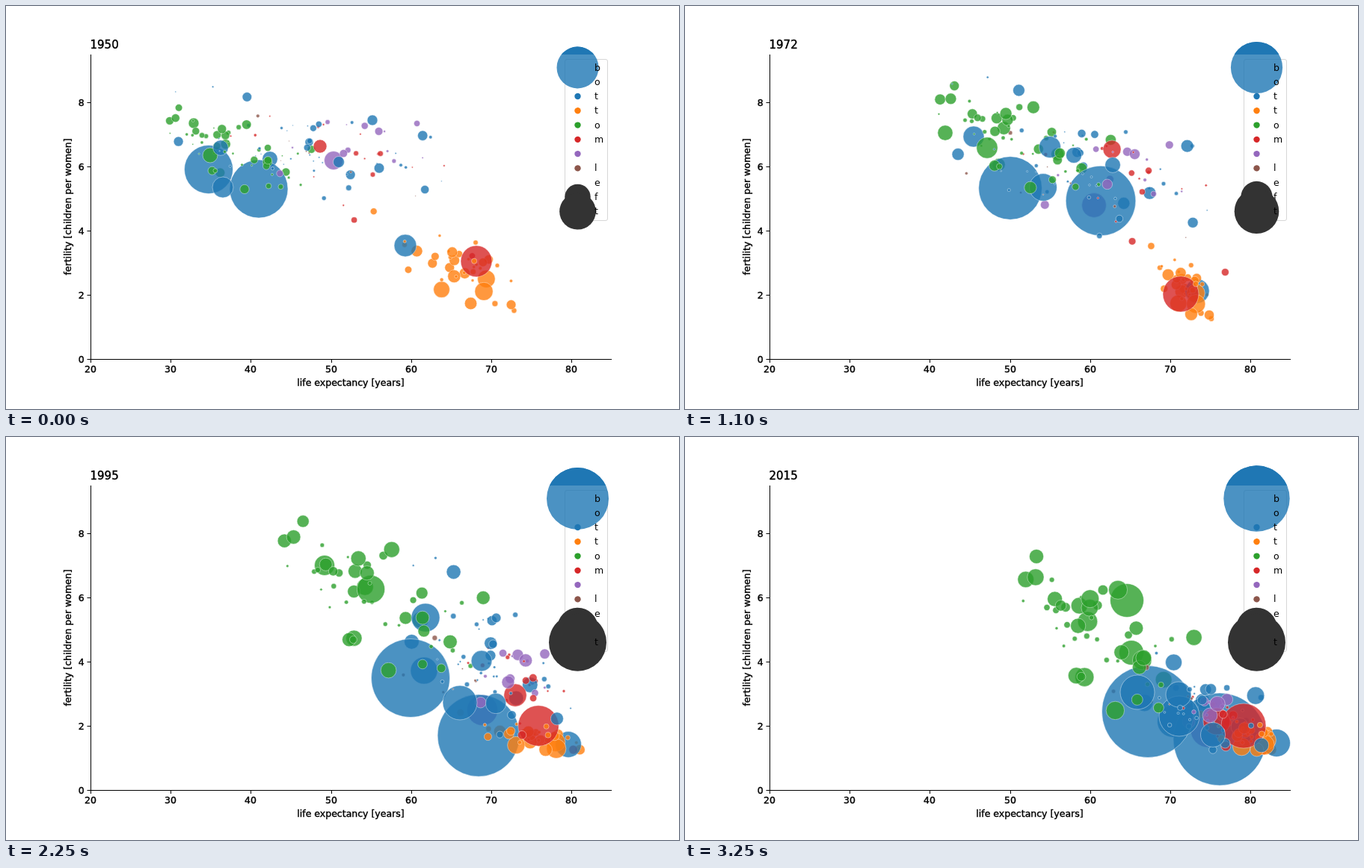
Recreate the animation shown at these times as an HTML page. Size 900 by 540 pixels, loop 3300 ms.

```html
<!DOCTYPE html>
<html lang="en">
<head>
<meta charset="utf-8">
<title>Fertility and life expectancy</title>
<style>
  html, body { margin: 0; width: 100%; height: 100%; overflow: hidden; background: #fff; }
  svg { display: block; }
  text { font: 12.5px "DejaVu Sans", sans-serif; }
  .axis text { stroke: #000; stroke-width: .4; }
  .axis .title { font-size: 15px; }
  .bubbles circle { opacity: .8; stroke: #fff; stroke-width: .5; }
</style>
</head>
<body>
<svg width="900" height="540" viewBox="0 0 900 540">
  <defs><clipPath id="above"><rect width="900" height="65"/></clipPath></defs>
  <g class="bubbles"></g>
  <g class="axis"><path d="M113.5 65V473.5H810" fill="none" stroke="#000"/></g>
  <g class="legend"></g>
</svg>
<script>
const FIRST = 1950, YEARS = 66, STEP = 50;
const COLORS = {
  blue: '#1f77b4', orange: '#ff7f0e', green: '#2ca02c',
  red: '#d62728', purple: '#9467bd', brown: '#8c564b'
};
const FINE = [1950, 1964, 1972, 1982, 1995, 2007, 2015];
const COARSE = [1950, 1972, 1995, 2015];

// Large countries: colour, first and last radius, x and y at the key years.
const GIANTS = [
  ['blue', 10.3, 21.5, [353, 386, 559, 653], [205, 175, 313, 381]],
  ['purple', 12.5, 24, [438, 547, 637, 700], [207, 267, 366, 392]],
  ['blue', 39, 62, [338, 456, 556, 598, 632, 682, 715], [245, 210, 261, 360, 400, 407, 405]],
  ['green', 7, 16.5, [251, 348, 426, 597], [157, 170, 172, 289]],
  ['blue', 32.5, 61.5, [271, 435, 541, 619], [219, 244, 323, 368]],
  ['blue', 14, 27, [290, 479, 607, 661], [243, 243, 356, 374]],
  ['blue', 15, 18.5, [534, 652, 685, 725, 752, 782, 791], [321, 388, 382, 397, 412, 415, 410]],
  ['red', 9, 18, [420, 571, 681, 711], [188, 192, 346, 381]],
  ['green', 10, 22.5, [273, 404, 488, 591], [200, 190, 204, 219]],
  ['blue', 10.3, 23, [287, 488, 561, 605], [190, 189, 242, 342]],
  ['blue', 7, 17, [490, 572, 636, 660], [153, 213, 300, 345]],
  ['red', 21, 30, [629, 652, 663, 699, 712, 736, 747], [342, 334, 386, 395, 387, 381, 387]],
  ['blue', 7.5, 16.5, [445, 520, 655, 706], [209, 200, 357, 399]]
];

// Smaller countries: centre and spread of each region at the coarse key years.
const REGIONS = [
  { color: 'green', count: 48, size: [1, 6, 2], growth: 2,
    x: [310, 450, 502, 562], y: [194, 178, 218, 268], sx: [45, 52, 62, 52], sy: [24, 30, 45, 45] },
  { color: 'blue', count: 42, size: [.8, 7, 3], growth: 1.75,
    x: [400, 525, 645, 692], y: [193, 215, 295, 365], sx: [85, 80, 50, 40], sy: [35, 48, 55, 30] },
  { color: 'orange', count: 38, size: [2, 10.5, 2.6], growth: 1.1,
    x: [602, 669, 702, 755], y: [350, 376, 402, 401], sx: [40, 18, 34, 25], sy: [26, 20, 11, 11] },
  { color: 'red', count: 17, size: [1, 3.6, 2], growth: 1.6,
    x: [450, 580, 685, 715], y: [210, 235, 335, 378], sx: [65, 55, 28, 22], sy: [45, 45, 38, 20] },
  { color: 'purple', count: 13, size: [1, 4.5, 2], growth: 1.9,
    x: [475, 585, 685, 706], y: [195, 235, 328, 370], sx: [55, 50, 25, 16], sy: [35, 42, 35, 15] },
  { color: 'brown', count: 9, size: [.7, 2.4, 2], growth: 1.7,
    x: [420, 530, 640, 685], y: [200, 240, 330, 350], sx: [70, 75, 55, 55], sy: [40, 50, 45, 30] }
];

const $ = selector => document.querySelector(selector);

function add(parent, tag, attrs, text = '') {
  const node = document.createElementNS('http://www.w3.org/2000/svg', tag);
  for (const key in attrs) node.setAttribute(key, attrs[key]);
  node.textContent = text;
  return parent.appendChild(node);
}

function seeded(seed) {
  return () => {
    seed = (seed * 1664525 + 1013904223) % 4294967296;
    return seed / 4294967296;
  };
}

// Smooth cubic through the values at unevenly spaced key years.
function curve(values, year) {
  const keys = values.length === FINE.length ? FINE : COARSE;
  const last = keys.length - 1;
  let i = 0;
  while (i < last - 1 && year > keys[i + 1]) i++;
  const slope = k => {
    const a = Math.max(k - 1, 0), b = Math.min(k + 1, last);
    return (values[b] - values[a]) / (keys[b] - keys[a]);
  };
  const span = keys[i + 1] - keys[i], s = (year - keys[i]) / span;
  const rise = values[i + 1] - values[i];
  const a = slope(i) * span - rise, b = rise - slope(i + 1) * span;
  return values[i] + rise * s + s * (1 - s) * (a * (1 - s) + b * s);
}

const pulse = (year, centre, width) => Math.exp(-(((year - centre) / width) ** 2));
const progress = year => (year - FIRST) / (YEARS - 1);

function giant([color, r0, r1, xs, ys], index) {
  const largest = r1 === 62;
  return {
    color, rank: (index + .5) / GIANTS.length,
    at(year) {
      let x = curve(xs, year), y = curve(ys, year);
      if (largest) {
        // Famine years and the rebound after them.
        x -= 180 * pulse(year, 1960.2, 1.3);
        y += 110 * pulse(year, 1960.7, 1.2) - 50 * pulse(year, 1963, .6);
      }
      return [x, y, r0 + (r1 - r0) * progress(year)];
    }
  };
}

const random = seeded(1950);
const bell = () => (random() + random() + random() - 1.5) * 2;

function small(region) {
  const u = bell(), v = .6 * u + .8 * bell();
  const [min, range, power] = region.size;
  const radius = min + range * random() ** power;
  const phase = random() * 6.28;
  return {
    color: region.color, rank: random(),
    at(year) {
      const wobble = Math.sin(year / 6 + phase);
      const x = curve(region.x, year) + u * curve(region.sx, year) + 3 * wobble;
      const y = curve(region.y, year) + v * curve(region.sy, year) + 2 * wobble;
      const r = radius * (1 + (region.growth - 1) * progress(year));
      return [Math.min(x, 784), Math.max(80, Math.min(y, 419)), r];
    }
  };
}

const bubbles = GIANTS.map(giant);
for (const region of REGIONS)
  for (let i = 0; i < region.count; i++) bubbles.push(small(region));
bubbles.sort((a, b) => a.rank - b.rank);
for (const b of bubbles) b.node = add($('.bubbles'), 'circle', { fill: COLORS[b.color] });

const axis = $('.axis');
for (let i = 0; i <= 6; i++) {
  const x = Math.round(113 + i * 107.2);
  add(axis, 'path', { d: `M${x + .5} 473v5`, stroke: '#000' });
  add(axis, 'text', { x, y: 491, 'text-anchor': 'middle' }, 20 + i * 10);
}
for (let i = 0; i <= 4; i++) {
  const y = Math.round(473 - i * 85.9);
  add(axis, 'path', { d: `M108.5 ${y + .5}h5`, stroke: '#000' });
  add(axis, 'text', { x: 104.7, y: y + 5, 'text-anchor': 'end' }, i * 2);
}
add(axis, 'text', { x: 461, y: 509, 'text-anchor': 'middle' }, 'life expectancy [years]');
add(axis, 'text', { transform: 'translate(87 269) rotate(-90)', 'text-anchor': 'middle' },
  'fertility [children per women]');
const title = add(axis, 'text', { class: 'title', x: 112.5, y: 57 });

const legend = $('.legend');
add(legend, 'rect', { x: 747.5, y: 71.5, width: 57, height: 216, rx: 2.5,
  fill: '#fff', 'fill-opacity': .8, stroke: '#ccc', 'stroke-opacity': .8 });
const handles = [...'bottom left'].map((letter, row) => {
  const y = 82.5 + row * 19.27;
  const dots = Object.values(COLORS);
  const fill = row === 0 ? COLORS.blue : row > 8 ? '#333' : dots[row - 2];
  const handle = fill && add(legend, 'circle', {
    cx: 764.5, cy: y, r: 4.2, fill, opacity: row === 0 ? .8 : 1
  });
  add(legend, 'text', { x: 787, y: y + 4 }, letter);
  return handle;
});
const cap = add(legend, 'circle', { cx: 764.5, cy: 82.5, fill: COLORS.blue, 'clip-path': 'url(#above)' });

function draw(time) {
  const year = FIRST + Math.floor(time / STEP) % YEARS;
  title.textContent = year;
  for (const { node, at } of bubbles) {
    const [x, y, r] = at(year);
    node.setAttribute('cx', x);
    node.setAttribute('cy', y);
    node.setAttribute('r', r);
  }
  const top = curve([28, 31.3, 34.6, 37.7, 41.5, 43.2, 44.2], year);
  handles[0].setAttribute('r', top);
  cap.setAttribute('r', top);
  const size = year < 1955 ? 400 : year < 1974 ? 600 : year < 1992 ? 800 : 1000;
  handles[9].setAttribute('r', Math.sqrt(size * .741));
  handles[10].setAttribute('r', Math.sqrt(size * 1.482));
}

const start = performance.now();
function tick() {
  draw(performance.now() - start);
  requestAnimationFrame(tick);
}
tick();
</script>
</body>
</html>
```
